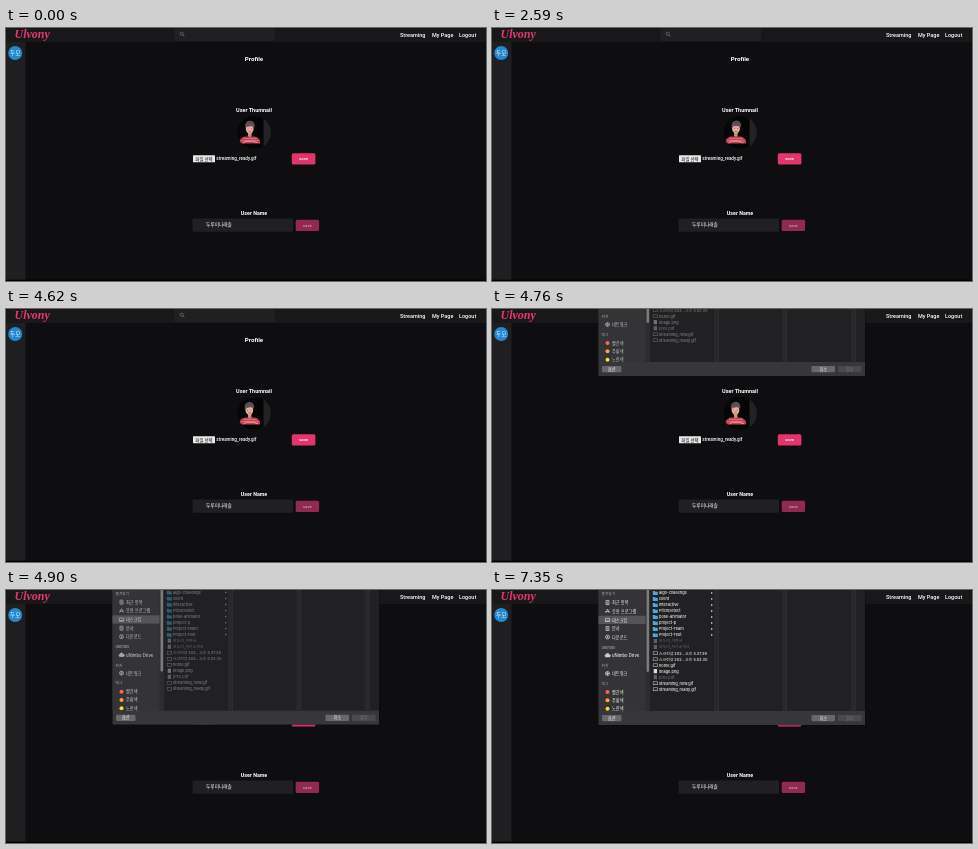
These frames come from a looping animation (480 px wide and 253 px high, 8000 ms). An HTML page:

```html
<!DOCTYPE html>
<html lang="en">
<head>
<meta charset="utf-8">
<title>Profile</title>
<style>
  html, body { margin: 0; width: 100%; height: 100%; overflow: hidden; background: #0e0e10; }
  svg { display: block; width: 100vw; height: 100vh; }
  text { font-family: Roboto, "Noto Sans CJK KR", "Noto Sans CJK", sans-serif; font-weight: 500; fill: #fff; }
  .logo { font: italic bold 12px "Liberation Serif", serif; fill: #e6376f; }
  .title { font-weight: 700; text-anchor: middle; }
  .mid { text-anchor: middle; }
  #sheet text { font-family: Inter, "Noto Sans CJK KR", "Noto Sans CJK", sans-serif; fill: #f0f0f0; }
  #sheet .head { fill: #a4a4a7; }
</style>
</head>
<body>
<svg viewBox="0 0 480 253" preserveAspectRatio="none">
  <defs>
    <clipPath id="round"><circle cx="248" cy="104.3" r="16.8"/></clipPath>
    <clipPath id="photo"><rect x="233" y="90" width="24" height="27"/></clipPath>
  </defs>

  <rect width="480" height="253" fill="#0e0e10"/>
  <rect y="14" width="19.5" height="238" fill="#1f1f22"/>
  <rect width="480" height="14" fill="#18181b"/>
  <rect y="251.7" width="480" height="1.3" fill="#000"/>
  <text class="logo" x="8.5" y="10.3">Ulvony</text>
  <rect x="168.5" width="100.5" height="13" rx="1" fill="#202023"/>
  <g fill="none" stroke="#77777a" stroke-width=".7">
    <circle cx="175.7" cy="5.8" r="1.6"/><path d="M176.9 7l1.6 1.6"/>
  </g>
  <g font-size="5.5">
    <text x="394" y="8.8">Streaming</text>
    <text x="426" y="8.8">My Page</text>
    <text x="453" y="8.8">Logout</text>
  </g>
  <circle cx="9.2" cy="25" r="7" fill="#2488ce"/>
  <text class="mid" x="9.2" y="27" font-size="5.6">두모</text>

  <text class="title" x="248" y="33" font-size="6.2">Profile</text>
  <text class="title" x="248" y="84.4" font-size="5.5">User Thumnail</text>
  <g clip-path="url(#round)">
    <rect x="231" y="87" width="34" height="35" fill="#232326"/>
    <rect x="231" y="87" width="26.5" height="35" fill="#050506"/>
    <g clip-path="url(#photo)">
      <path d="M233.5 115.500v-2.500q1.500-4 5.500-4.500h9.500q4 .5 5.500 4.500v2.500z" fill="#c23f55"/>
      <path d="M237.500 110.500h13M235.500 112.600h17" stroke="#e88f98" stroke-width=".6"/>
      <g id="head">
        <path d="M242 103.500h3.600v4.800q-1.800 1.500-3.600 0z" fill="#c98c7a"/>
        <ellipse cx="243.700" cy="100.800" rx="3.900" ry="4.800" fill="#e3b09e"/>
        <path d="M239.200 99.800q-.7-6.800 4.600-7.100t4.900 6.700q-4.700-2.700-9.500.4z" fill="#505157"/>
        <path d="M239.600 98q4.300-2.500 8.800-.3" fill="none" stroke="#a84450" stroke-width=".8"/>
        <circle cx="242.100" cy="100.900" r=".45" fill="#252025"/>
        <circle cx="245.400" cy="100.900" r=".45" fill="#252025"/>
        <path d="M242.500 103.400q1.300 1 2.500 0" fill="none" stroke="#8c343c" stroke-width=".6"/>
      </g>
      <path id="arm" d="M237 115l3.200-1.800h6.500l5 1.600" fill="none" stroke="#e3b09e" stroke-width=".9"/>
    </g>
  </g>
  <rect x="187" y="127.300" width="22" height="7" rx=".6" fill="#e9e9e9"/>
  <text class="mid" x="198" y="132.500" font-size="4.400" style="fill:#111">파일 선택</text>
  <text x="210.300" y="132.300" font-size="4.550">streaming_ready.gif</text>
  <rect x="285.800" y="125.200" width="23.600" height="11.300" rx="1.500" fill="#e2356c"/>
  <text class="mid" x="297.600" y="132.300" font-size="4.400">save</text>

  <text class="title" x="248" y="186.800" font-size="5.300">User Name</text>
  <rect x="186.500" y="190.500" width="100.500" height="13.200" rx="1.500" fill="#202023"/>
  <text x="200" y="198.400" font-size="4.700">두루미나래솔</text>
  <rect x="289.700" y="191.700" width="23.400" height="11.300" rx="1.500" fill="#902a4f"/>
  <text class="mid" x="301.400" y="198.800" font-size="4.400" style="fill:#c89bac">save</text>

  <g id="sheet">
    <rect x="106" y="-6" width="267.500" height="141.500" fill="#000" opacity=".4"/>
    <rect x="106.500" y="-6" width="266.500" height="141" fill="#373739"/>
    <rect x="158" y="-6" width="215" height="127" fill="#212123"/>
  </g>
</svg>
<script>
const sheet = document.getElementById("sheet");
const head = document.getElementById("head");
const arm = document.getElementById("arm");

function add(tag, attrs, parent = sheet, content = "") {
  const node = document.createElementNS("http://www.w3.org/2000/svg", tag);
  for (const key in attrs) node.setAttribute(key, attrs[key]);
  node.textContent = content;
  parent.append(node);
  return node;
}
const box = (x, y, width, height, fill, rx = 0, parent = sheet) =>
  add("rect", { x, y, width, height, fill, rx }, parent);
const label = (content, x, y, size, extra = {}, parent = sheet) =>
  add("text", { x, y: y + size * 0.36, "font-size": size, ...extra }, parent, content);

// Columns, scroll bars and footer
for (const x of [222, 290.3, 358.7]) {
  box(x, -6, 4.3, 127, "#29292b");
  box(x + 4.3, -6, 0.5, 127, "#38383a");
}
box(106.500, -6, 47, 127, "#343436");
box(153.500, -6, 4.500, 127, "#2d2d2f");
box(154.500, -6, 2.600, 88, "#7b7b7e", 1.3);
for (const [name, x, w, fill, color] of [
  ["옵션", 110, 19.500, "#68686b", "#eee"],
  ["취소", 319.500, 23.500, "#68686b", "#eee"],
  ["열기", 346, 23.500, "#4a4a4c", "#77777a"]
]) {
  box(x, 125, w, 6.300, fill, 1);
  label(name, x + w / 2, 128.100, 4.200, { class: "mid", style: "fill:" + color });
}

// Sidebar
box(106.500, 25.700, 47, 8.300, "#555558");
for (const [name, y] of [["즐겨찾기", 4], ["uNimbo", 57.500], ["위치", 75.700], ["태그", 93.500]])
  label(name, 109.500, y, 3.700, { class: "head" });

const places = add("g", {});
const glyphs = {
  page: "M-1.500-2h3v4h-3zM-.8-.5h1.600M-.8.7h1.600",
  desk: "M-2.200-1.600h4.400v3.200h-4.400zM-2.200.8h4.400",
  apps: "M-1.800 1.800L0-2l1.800 3.800M-2.200.6h4.400",
  down: "M-2 0a2 2 0 1 0 4 0a2 2 0 1 0-4 0M0-1.200v2.200l-.8-.8M0 1l.8-.8",
  cloud: "M-1.700 1.400h3.500a1.100 1.100 0 0 0 0-2.200a1.800 1.800 0 0 0-3.400-.1a1.200 1.200 0 0 0 0 2.300",
  globe: "M-2 0a2 2 0 1 0 4 0a2 2 0 1 0-4 0M-2 0h4M0-2v4"
};
for (const [name, y, icon] of [
  ["최근 항목", 12.500, "page"], ["응용 프로그램", 21, "apps"], ["데스크탑", 30, "desk"],
  ["문서", 38.500, "page"], ["다운로드", 47, "down"], ["uNimbo Drive", 65.500, "cloud"],
  ["네트워크", 83.500, "globe"], ["빨간색", 102, "#ff625c"], ["주황색", 110.300, "#ffa43a"],
  ["노란색", 118.700, "#ffd83d"]
]) {
  if (icon[0] === "#") add("circle", { cx: 115.500, cy: y, r: 2, fill: icon });
  else add("path", {
    d: glyphs[icon], transform: `translate(115.500 ${y})`,
    fill: icon === "cloud" ? "#ccc" : "none", stroke: "#ccc", "stroke-width": 0.75
  }, places);
  label(name, 120, y, 4.200, {}, places);
}

// File list: a leading "/" is a folder, "-" is a file that cannot be chosen
const files = add("g", {});
["/algo-challenge", "/client", "/interactive", "/PitchDetect", "/pose-animator", "/project-p",
  "/Project-Team", "/Project-Test", "-모두리_이력서", "-모두리_자기소개서",
  "스크린샷 202...오후 5.37.39", "스크린샷 202...오후 5.53.30",
  "home.gif", "image.png", "-prev.pdf", "streaming_now.gif", "streaming_ready.gif"
].forEach((entry, i) => {
  const y = 2.900 + i * 6.020;
  const folder = entry[0] === "/", locked = entry[0] === "-";
  const row = add("g", { opacity: locked ? 0.33 : 1 }, files);
  if (!locked) row.classList.add("open");
  if (folder) {
    add("path", { d: `M160.800 ${y - 1.900}h2l.6.7h2.400v3.200h-5z`, fill: "#4da9dc" }, row);
    add("path", { d: `M219 ${y - 1.200}l2 1.200l-2 1.200z`, fill: "#bbb" }, row);
  } else if (locked || entry.endsWith("png")) {
    box(161.700, y - 2.100, 3.300, 4.200, "#ddd", 0, row);
  } else {
    box(160.900, y - 1.700, 4.800, 3.400, "#d0d0d0", 0.3, row);
    box(161.400, y - 1.200, 3.800, 2.400, "#28282b", 0, row);
  }
  label(folder || locked ? entry.slice(1) : entry, 167, y, 3.900, {}, row);
});
const openRows = files.querySelectorAll(".open");

const LOOP = 8000, SLIDE_START = 4611, SLIDE_TIME = 300, FILES_READY = 5250;

function draw(now) {
  const t = now % LOOP;
  const sway = Math.sin(t / 1400 * 2 * Math.PI);
  head.setAttribute("transform", `translate(0 ${0.25 * sway}) rotate(${-3 * sway} 244 108)`);
  arm.setAttribute("transform", `translate(${0.4 * sway} 0)`);

  const p = Math.min(1, Math.max(0, (t - SLIDE_START) / SLIDE_TIME));
  const eased = (1 - Math.cos(Math.PI * p)) / 2;
  sheet.setAttribute("transform", `translate(0 ${-136 * (1 - eased)})`);
  sheet.style.visibility = p > 0 ? "visible" : "hidden";

  const ready = t >= FILES_READY;
  places.setAttribute("opacity", ready ? 1 : 0.75);
  for (const row of openRows) row.setAttribute("opacity", ready ? 1 : 0.42);
  requestAnimationFrame(draw);
}
requestAnimationFrame(draw);
</script>
</body>
</html>
```
